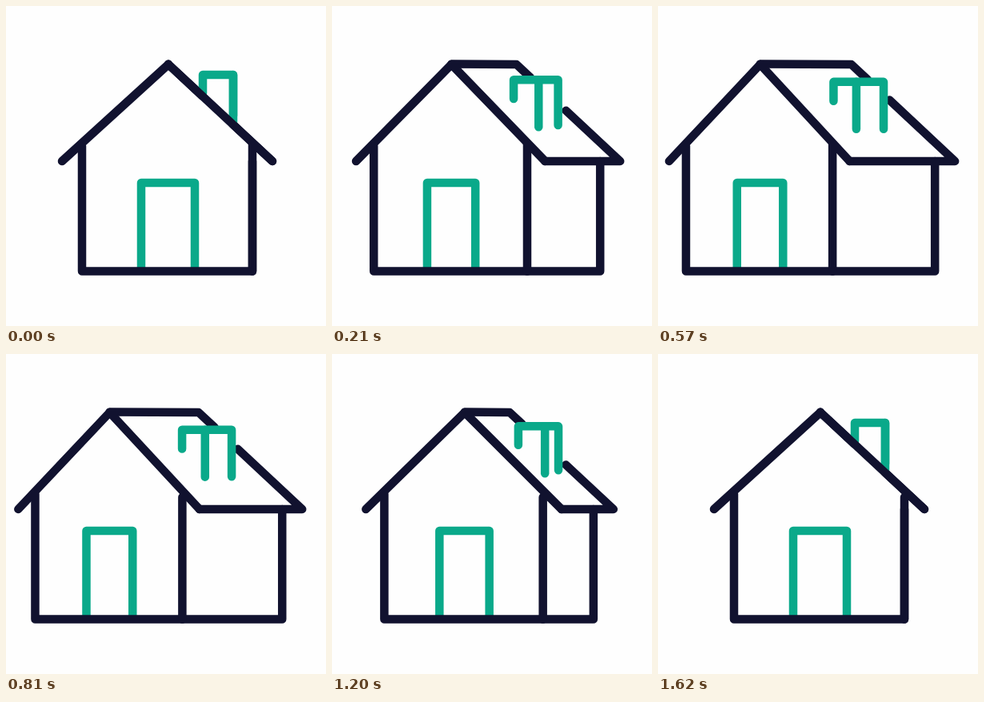
These frames come from a looping animation (400 px wide and 400 px high, 3.65 s). An HTML page with a canvas:

```html
<!DOCTYPE html>
<html lang="en">
<head>
<meta charset="utf-8">
<title>Turning house</title>
<style>
  html, body { margin: 0; width: 100%; height: 100%; overflow: hidden; background: #fefefe; }
  canvas { display: block; width: 100vw; height: 100vh; }
</style>
</head>
<body>
<canvas id="stage"></canvas>
<script>
const SIZE = 400, LOOP = 3650, STEP = 30, TURN = 600, END = 1620;
const NAVY = '#11122f', GREEN = '#0aa98a';
const RIDGE = 73, EAVE = 194, BASE = 331.5;

const canvas = document.getElementById('stage');
const ctx = canvas.getContext('2d');
const dpr = window.devicePixelRatio || 1;
canvas.width = canvas.height = SIZE * dpr;

// Cubic bezier easing with horizontal end tangents.
function ease(t, a, b) {
  if (t <= 0) return 0;
  if (t >= 1) return 1;
  let lo = 0, hi = 1;
  for (let i = 0; i < 30; i++) {
    const u = (lo + hi) / 2, v = 1 - u;
    if (3 * a * u * v * v + 3 * b * u * u * v + u * u * u < t) lo = u;
    else hi = u;
  }
  return lo * lo * (3 - 2 * lo);
}

function turnAt(t) {
  return t < TURN
    ? ease(t / TURN, 0.17, 0.09)
    : 1 - ease((t - TURN) / (END - TURN), 0.83, 0.4);
}

function line(color, ...points) {
  ctx.strokeStyle = color;
  ctx.beginPath();
  points.forEach(([x, y]) => ctx.lineTo(x, y));
  ctx.stroke();
}

function draw(t) {
  const p = 0.985 * turnAt(t);
  const at = (from, shift) => from + shift * p;

  ctx.setTransform(dpr, 0, 0, dpr, 0, 0);
  ctx.fillStyle = '#fefefe';
  ctx.fillRect(0, 0, SIZE, SIZE);
  ctx.lineWidth = 10.5;
  ctx.lineCap = ctx.lineJoin = 'round';

  const peak = at(203, -76.5), backPeak = at(203, 39.3);
  const eave = at(333, -95), backEave = at(333, 38.8);
  const left = at(95, -61), right = at(308, -91.3), back = at(308, 38.8);

  // Far slope, broken where the chimney stands
  const chimLeft = at(246, -27), chimMid = at(284, -36.7), chimRight = at(284, -2);
  const chimTop = at(86, 9);
  const slope = s => [backPeak + (backEave - backPeak) * s, RIDGE + (EAVE - RIDGE) * s];
  const gapStart = Math.max((chimLeft - 1 - backPeak) / 130, (chimTop - 3 - RIDGE) / 121);
  const gapEnd = 0.62 - 0.07 * p - 0.19 * p * p;
  line(NAVY, [peak, RIDGE - 0.5], [backPeak, RIDGE], slope(gapStart));
  line(NAVY, slope(gapEnd), [backEave, EAVE], [eave, EAVE]);

  // Chimney
  line(GREEN, [chimLeft, at(109, 10)], [chimLeft, chimTop], [chimRight, chimTop], [chimRight, at(137, 17)]);
  line(GREEN, [chimMid, chimTop], [chimMid, at(145, 9)]);

  // Door
  const doorLeft = at(169, -71.4), doorRight = at(236, -81);
  line(GREEN, [doorLeft, BASE - 1], [doorLeft, 221], [doorRight, 221], [doorRight, BASE - 1]);

  // Walls
  line(NAVY, [left, 175], [left, BASE], [back, BASE], [back, EAVE]);
  line(NAVY, [right, t < TURN ? 172 : 179], [right, BASE]);

  // Gable
  line(NAVY, [at(70, -57), EAVE], [peak, RIDGE], [eave, EAVE]);
}

function frame() {
  const t = performance.now() % LOOP;
  draw(Math.min(END, Math.floor(t / STEP) * STEP));
  requestAnimationFrame(frame);
}
frame();
</script>
</body>
</html>
```
